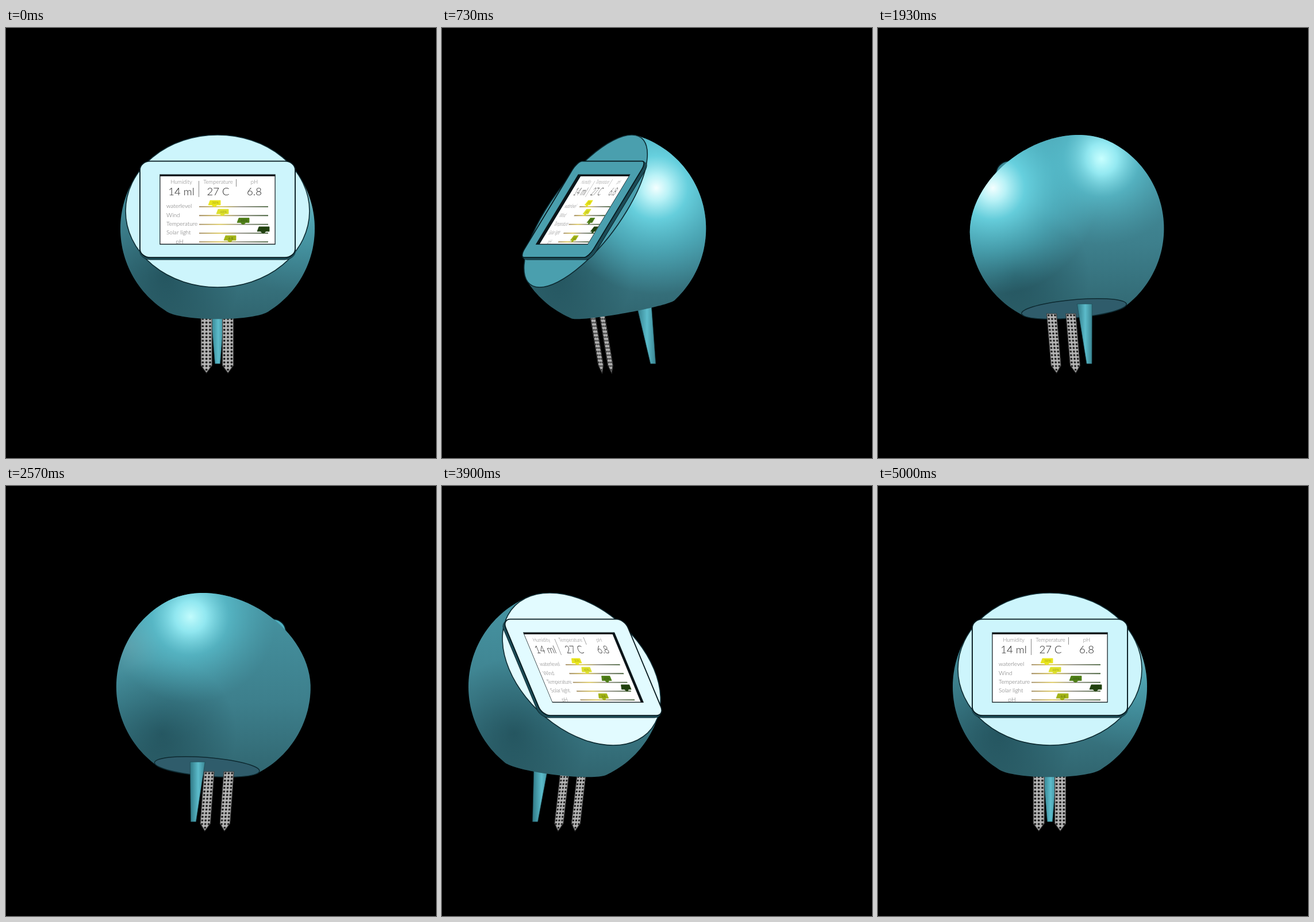
These frames come from a looping animation (748x748 px, 5.03 s). An HTML page:

```html
<!DOCTYPE html>
<html lang="en">
<head>
<meta charset="utf-8">
<title>Plant sensor turntable</title>
<style>
  html, body { margin: 0; width: 100%; height: 100%; overflow: hidden; background: #000; }
  svg { display: block; width: 100vw; height: 100vh; }
  text { font-family: Lato, "Open Sans", sans-serif; font-weight: 300; }
  .line { vector-effect: non-scaling-stroke; }
</style>
</head>
<body>
<svg viewBox="0 0 748 748" xmlns="http://www.w3.org/2000/svg">
  <defs>
    <linearGradient id="skin" gradientUnits="userSpaceOnUse" x1="0" y1="180" x2="0" y2="507">
      <stop offset="0" stop-color="#4796a4"/>
      <stop offset=".6" stop-color="#3d7f8c"/>
      <stop offset="1" stop-color="#30656f"/>
    </linearGradient>
    <radialGradient id="shade" gradientUnits="userSpaceOnUse" cy="430" r="130">
      <stop offset="0" stop-color="#123740" stop-opacity=".5"/>
      <stop offset="1" stop-color="#123740" stop-opacity="0"/>
    </radialGradient>
    <radialGradient id="glow0" gradientUnits="userSpaceOnUse" r="185">
      <stop offset="0" stop-color="#f4ffff"/>
      <stop offset=".12" stop-color="#c4fbff" stop-opacity=".92"/>
      <stop offset=".3" stop-color="#6fe0ee" stop-opacity=".8"/>
      <stop offset=".6" stop-color="#56c3d3" stop-opacity=".55"/>
      <stop offset="1" stop-color="#4fb5c5" stop-opacity="0"/>
    </radialGradient>
    <radialGradient id="glow1" gradientUnits="userSpaceOnUse" r="150">
      <stop offset="0" stop-color="#c8ffff"/>
      <stop offset=".18" stop-color="#9df3fb" stop-opacity=".9"/>
      <stop offset=".45" stop-color="#5fc9d8" stop-opacity=".6"/>
      <stop offset="1" stop-color="#4fa9b8" stop-opacity="0"/>
    </radialGradient>
    <linearGradient id="metal">
      <stop offset="0" stop-color="#2f7885"/>
      <stop offset=".55" stop-color="#5cbccb"/>
      <stop offset="1" stop-color="#3a8592"/>
    </linearGradient>
    <linearGradient id="scale" gradientUnits="userSpaceOnUse" x1="-32" y1="0" x2="88" y2="0">
      <stop offset="0" stop-color="#a08a62"/>
      <stop offset=".3" stop-color="#dcc652"/>
      <stop offset=".6" stop-color="#8c8a80"/>
      <stop offset="1" stop-color="#48633c"/>
    </linearGradient>
    <pattern id="mesh" width="6.3" height="6.3" x="-9.5" y="3" patternUnits="userSpaceOnUse">
      <rect width="6.3" height="6.3" fill="#b4b4b4"/>
      <circle cx="3.15" cy="3.15" r="1.9" fill="#111"/>
    </pattern>
    <clipPath id="window"><path id="windowShape"/></clipPath>
  </defs>
  <rect width="748" height="748"/>
  <g id="stage"></g>
</svg>
<script>
const LOOP = 5030, STEP = 100 / 3;
const RADIUS = 169, MID_Y = 349;
const FACE = { y: 318.5, z: 45, slope: .676, rx: 160, ry: 132.5, nx: .828, ny: .56 };
const BASE = { y: 488.5, z: -27.6, slope: 5.05, rx: 91.6, ry: 17.8 };
const PANEL_HEIGHT = 6;

const centreKeys = [[0, 368], [170, 375], [530, 332], [730, 291], [1000, 222], [1100, 231],
  [1300, 270], [1600, 314], [2130, 336], [2570, 361], [2700, 365], [3200, 294], [3367, 271],
  [3700, 198], [3900, 215], [4270, 249], [4800, 283], [5000, 299]];
const turnKeys = [[0, 0], [733, -63.5], [1300, -106], [2567, -204], [3367, -288], [3900, -322], [5000, -360]];
const faceTones = [[-90, 60, 138, 152], [-63, 74, 159, 174], [-32, 134, 210, 222], [0, 205, 245, 252],
  [38, 226, 251, 255], [72, 122, 224, 240], [90, 79, 176, 192]];
const lights = [{ azimuth: 96, lift: .42 }, { azimuth: 184, lift: .72 }];

const $ = id => document.getElementById(id);
const rad = deg => deg * Math.PI / 180;
const clamp = (v, lo = 0, hi = 1) => Math.min(hi, Math.max(lo, v));

function add(parent, tag, attrs = {}, text) {
  const el = document.createElementNS('http://www.w3.org/2000/svg', tag);
  set(el, attrs);
  if (text) el.textContent = text;
  parent.appendChild(el);
  return el;
}
function set(el, attrs) {
  for (const name in attrs) el.setAttribute(name, attrs[name]);
}
const toPath = pts => 'M' + pts.map(p => p[0].toFixed(2) + ' ' + p[1].toFixed(2)).join('L') + 'Z';

// Monotone cubic through [time, value] keys
function curve(keys) {
  const slope = i => (keys[i + 1][1] - keys[i][1]) / (keys[i + 1][0] - keys[i][0]);
  const last = keys.length - 1;
  const tangent = keys.map((_, i) => {
    if (i === 0) return slope(0);
    if (i === last) return slope(last - 1);
    const a = slope(i - 1), b = slope(i);
    return a * b <= 0 ? 0 : 2 * a * b / (a + b);
  });
  return t => {
    let i = 0;
    while (i < last - 1 && t > keys[i + 1][0]) i++;
    const [t0, v0] = keys[i], [t1, v1] = keys[i + 1], d = t1 - t0;
    const u = clamp((t - t0) / d), w = 1 - u;
    return v0 * w * w * (1 + 2 * u) + v1 * u * u * (3 - 2 * u)
      + d * u * w * (tangent[i] * w - tangent[i + 1] * u);
  };
}
const centreAt = curve(centreKeys), turnAt = curve(turnKeys);

function toneAt(angle) {
  let i = 0;
  while (i < faceTones.length - 2 && angle > faceTones[i + 1][0]) i++;
  const a = faceTones[i], b = faceTones[i + 1];
  const u = clamp((angle - a[0]) / (b[0] - a[0]));
  return 'rgb(' + [1, 2, 3].map(k => Math.round(a[k] + (b[k] - a[k]) * u)) + ')';
}

function hull(points) {
  points.sort((a, b) => a[0] - b[0] || a[1] - b[1]);
  const half = list => {
    const out = [];
    for (const p of list) {
      while (out.length > 1) {
        const [a, b] = out.slice(-2);
        if ((b[0] - a[0]) * (p[1] - a[1]) - (b[1] - a[1]) * (p[0] - a[0]) > 0) break;
        out.pop();
      }
      out.push(p);
    }
    out.pop();
    return out;
  };
  return half(points).concat(half(points.slice().reverse()));
}

// Parts
const stage = $('stage');
const legs = add(stage, 'g'), panel = add(stage, 'g'), body = add(stage, 'g'), front = add(stage, 'g');

const pins = [-19.3, 18.1].map(x => ({
  x, el: add(legs, 'path', { d: 'M-9.5 -3H9.5V87L0 100L-9.5 87Z', fill: 'url(#mesh)',
    stroke: '#3c3c3c', 'stroke-width': 1.2, class: 'line' })
}));
const spike = add(legs, 'path', { fill: 'url(#metal)', stroke: '#1c4851', 'stroke-width': .7 });

const skins = ['skin', 'shade', 'glow1', 'glow0'].map(id => add(body, 'path', { fill: `url(#${id})` }));
const base = add(body, 'ellipse', { rx: BASE.rx, ry: BASE.ry, fill: '#2f5c6b', stroke: '#0d2930',
  'stroke-width': 1.5, class: 'line' });
const face = add(front, 'ellipse', { rx: FACE.rx, ry: FACE.ry, stroke: '#0d2a31', 'stroke-width': 1.6, class: 'line' });

const slab = { x: -135, y: -83.5, width: 270, height: 167.5, rx: 18, ry: 15, class: 'line' };
const layers = [];
for (let h = 0; h <= PANEL_HEIGHT; h++) {
  const edge = h === 0 || h === PANEL_HEIGHT;
  layers.push(add(panel, 'rect', { ...slab, fill: '#1d4c57',
    stroke: edge ? '#07191e' : '#1d4c57', 'stroke-width': 1.8 }));
}

const display = add(front, 'g');
const opening = add(display, 'path', { fill: '#0a1519', stroke: '#0a1519', 'stroke-width': 1.4 });
const screen = add(add(display, 'g', { 'clip-path': 'url(#window)' }), 'g');
buildScreen();

function buildScreen() {
  add(screen, 'rect', { x: -99.5, y: -60, width: 199, height: 117.5, fill: '#fff' });
  const label = (x, y, size, fill, text, anchor = 'middle') =>
    add(screen, 'text', { x, y, 'font-size': size, fill, 'text-anchor': anchor }, text);
  [['Humidity', '14 ml', -63], ['Temperature', '27 C', 1], ['pH', '6.8', 64]].forEach(([name, value, x]) => {
    label(x, -46.5, 9.5, '#777', name);
    label(x, -27, 18.5, '#222', value);
  });
  add(screen, 'path', { d: 'M-32.5 -52V-24M32.5 -55V-42', stroke: '#888', 'stroke-width': 1 });
  const rows = [['waterlevel', -4, '#e9e51c', '30%'], ['Wind', 10, '#dde02c', '40%'],
    ['Temperature', 46, '#4f7f18', '65%'], ['Solar light', 81, '#21420f', '95%'], ['pH', 23, '#a2b316', '6.8']];
  rows.forEach(([name, x, color, value], i) => {
    const y = -7 + i * 15.3;
    const inset = name === 'pH';
    label(inset ? -66 : -89, y + 2.5, 10, '#666', name, inset ? 'middle' : 'start');
    add(screen, 'path', { d: `M-32 ${y}H88`, stroke: 'url(#scale)', 'stroke-width': 1.8 });
    add(screen, 'path', { d: `M${x - 9} ${y - 11}h18v8h-6l-3 3h-3l-3 -3h-6Z`, fill: color,
      stroke: color, 'stroke-width': .8, 'stroke-linejoin': 'round' });
    label(x, y - 4.5, 6, i < 2 ? '#77780c' : '#26380c', value);
  });
}

function render(time) {
  const centre = centreAt(time), turn = turnAt(time);
  const s = Math.sin(rad(turn)), c = Math.cos(rad(turn));
  const facing = c > 0;

  const plane = (el, y, z, slope, x = 0) =>
    set(el, { transform: `matrix(${c} 0 ${slope * s} 1 ${centre + z * s + x * c} ${y})` });
  const onFace = (el, h) => plane(el, FACE.y - FACE.ny * h, FACE.z + FACE.nx * h, FACE.slope);
  const ring = ({ y, z, slope, rx, ry }) => Array.from({ length: 90 }, (_, i) => {
    const a = rad(i * 4), v = ry * Math.sin(a);
    return [centre + rx * Math.cos(a) * c + (z + v * slope) * s, y + v];
  });

  // Sphere outline kept on the inner side of the face and base cuts
  const outline = [];
  for (let i = 0; i < 180; i++) {
    const a = rad(i * 2), x = RADIUS * Math.cos(a), y = RADIUS * Math.sin(a), depth = x * s;
    if (depth * FACE.nx - y * FACE.ny < 54.4 && y * .981 - depth * .194 < 142)
      outline.push([centre + x, MID_Y + y]);
  }
  const shape = toPath(hull(outline.concat(ring(FACE), ring(BASE))));
  skins.forEach(el => set(el, { d: shape }));

  set($('shade'), { cx: centre - 90 });
  lights.forEach(({ azimuth, lift }, i) => {
    const a = rad(azimuth + turn), flat = Math.sqrt(1 - lift * lift);
    set($('glow' + i), { cx: centre + RADIUS * flat * Math.sin(a), cy: MID_Y - RADIUS * lift });
    set(skins[3 - i], { opacity: clamp((flat * Math.cos(a) + .35) / .6) });
  });

  pins.forEach(({ x, el }) => plane(el, 500, 22, -.185, x));
  const top = centre - 68 * s, tip = centre - 86 * s;
  set(spike, { d: toPath([[top - 13, 480], [top + 13, 480], [tip + 4.5, 584], [tip - 4.5, 584]]) });
  plane(base, BASE.y, BASE.z, BASE.slope);
  base.style.display = facing ? 'none' : '';

  const tone = toneAt(((turn + 540) % 360 + 360) % 360 - 180);
  onFace(face, 0);
  set(face, { fill: tone });
  layers.forEach(onFace);
  set(layers[PANEL_HEIGHT], { fill: tone });

  const lidY = FACE.y - FACE.ny * PANEL_HEIGHT, lidZ = FACE.z + FACE.nx * PANEL_HEIGHT;
  const frame = toPath([[-100, -60], [100, -60], [100, 61], [-100, 61]].map(([x, y]) =>
    [centre + x * c + (lidZ + y * FACE.slope) * s, lidY + y]));
  set(opening, { d: frame });
  set($('windowShape'), { d: frame });
  onFace(screen, 1);

  if (facing) {
    legs.prepend(spike);
    front.append(face, panel, display);
    stage.append(legs, body, front);
  } else {
    legs.append(spike);
    stage.append(panel, body, legs);
  }
  front.style.display = facing ? '' : 'none';
}

const start = performance.now();
function tick() {
  const t = (performance.now() - start) % LOOP;
  render(Math.min(150, Math.floor((t + 4) / STEP)) * STEP);
  requestAnimationFrame(tick);
}
tick();
</script>
</body>
</html>
```
